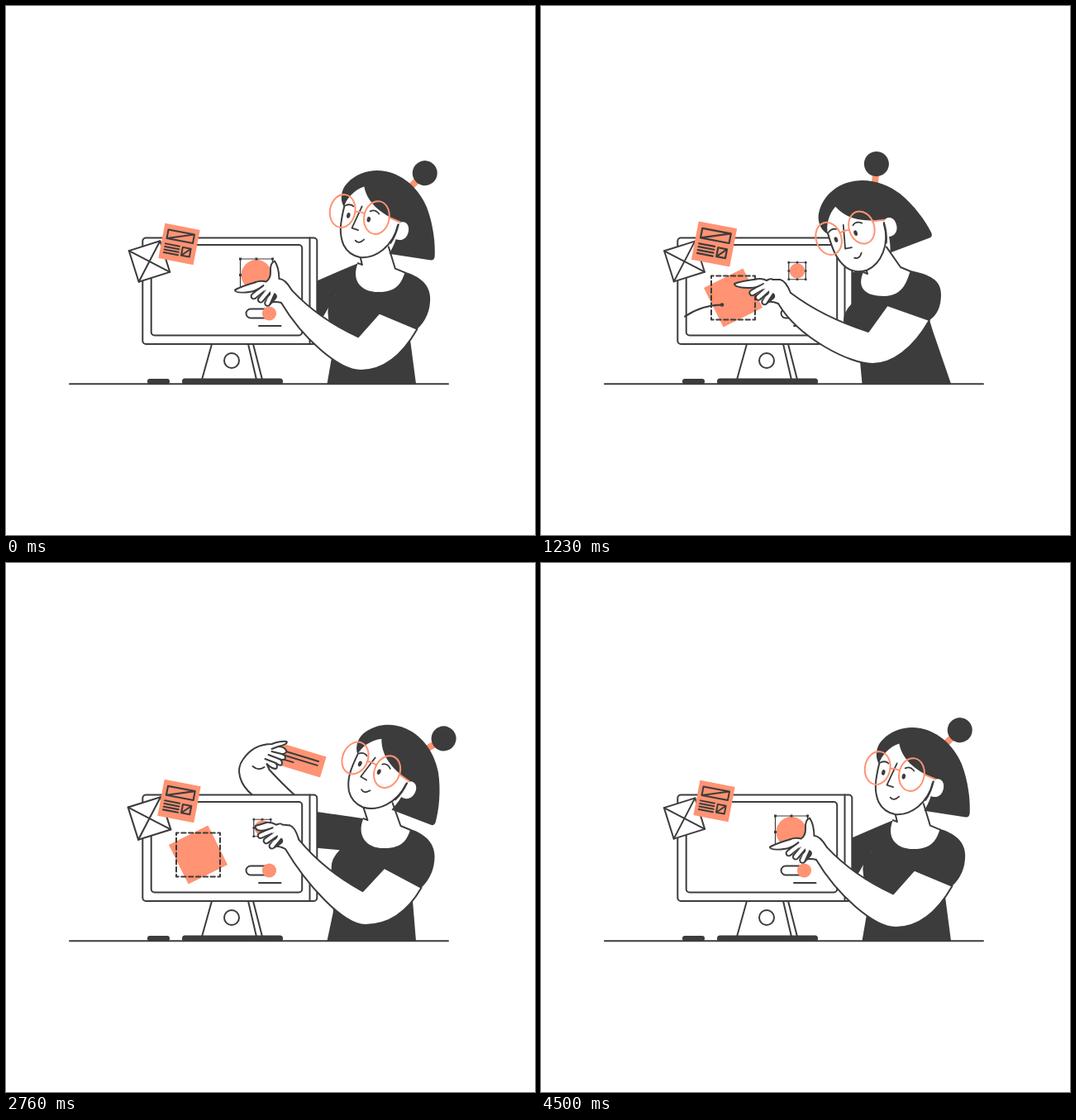
Write an HTML page with a canvas that moves like this. It is 640 px wide and 640 px high and loops after 4530 ms.

```html
<!DOCTYPE html>
<html lang="en">
<head>
<meta charset="utf-8">
<title>Designer at work</title>
<style>
html, body { margin: 0; height: 100%; overflow: hidden; background: #fff; }
canvas { display: block; }
</style>
</head>
<body>
<canvas id="stage" width="640" height="640"></canvas>
<script>
const ctx = document.getElementById('stage').getContext('2d');
const LOOP = 4530, INK = '#3c3c3c', CORAL = '#ff9373', WHITE = '#fff';
let t = 0;

const rad = deg => deg * Math.PI / 180;
const mix = (a, b, k) => a.map((v, i) => v + (b[i] - v) * k);
const arc = k => Math.sin(Math.PI * k);
// Eased 0 to 1 between two times
function ramp(from, to) {
  const u = Math.min(1, Math.max(0, (t - from) / (to - from)));
  return u * u * (3 - 2 * u);
}

function paint(path, fill, stroke, width = 2) {
  if (fill) { ctx.fillStyle = fill; ctx.fill(path); }
  if (stroke) { ctx.strokeStyle = stroke; ctx.lineWidth = width; ctx.stroke(path); }
}
const draw = (d, ...style) => paint(new Path2D(d), ...style);
function oval(x, y, rx, ry, ...style) {
  const path = new Path2D();
  path.ellipse(x, y, rx, ry, 0, 0, 7);
  paint(path, ...style);
}
function box(x, y, w, h, r, ...style) {
  const path = new Path2D();
  path.roundRect(x, y, w, h, r);
  paint(path, ...style);
}
function group(x, y, deg, scale, content) {
  ctx.save();
  ctx.translate(x, y);
  ctx.rotate(rad(deg));
  ctx.scale(scale, scale);
  content();
  ctx.restore();
}

// Lean to the screen, rise away with the card, settle back
function woman() {
  const back = [427.8, 252, 11, 333, 359, -9, 0];
  const leaning = [368, 274.7, -18.6, 287, 360, 0, -12];
  const away = [441.8, 244.3, 23.3, 338, 346, 6, 0];
  const reachOut = ramp(0, 1150), rise = ramp(1850, 2700), settle = ramp(2790, 3240);
  const [headX, headY, tilt, handX, handY, handTilt, sway] =
    mix(mix(mix(back, leaning, reachOut), away, rise), back, settle);
  const x = headX - 10 * arc(reachOut);
  return {
    x, y: headY, tilt, sway, handX,
    handY: handY + 15 * arc(reachOut) - 12 * arc(rise),
    handTilt: handTilt - 15 * (arc(reachOut) + arc(rise)),
    thumb: 1 - ramp(0, 400) + settle,
    point: 1 - ramp(2100, 2700) + settle,
    lean: Math.max(0, (x - 368) / 75) ** .8
  };
}

function farArm() {
  if (t < 1700 || t > 4300) return;
  const raised = mix([240, 315, -35], [357.5, 239, 17], ramp(1700, 2700));
  const held = mix(raised, [335, 255, 5], ramp(2790, 3300));
  const [x, y, tilt] = mix(held, [300, 325, -15], ramp(3830, 4300));
  group(x, y, tilt, 1, () => {
    box(-27.5, -13, 55, 26, 0, CORAL);
    draw('M-22-5H20M-22 0H20M-22 5H-9', null, INK);
  });
  group(x, y, tilt - 17, 1, () => {
    ctx.translate(-358, -239);
    draw(`M315 305Q305 285 299 281C283 268 278 250 287 238C297 223 310 219 322 219Q333 215 340 216
      Q342 219 330 222Q338 222 340 228Q339 231 334 231Q340 233 338 237Q336 239 331 237Q336 240 334 244
      Q332 246 327 242Q330 247 327 249Q322 249 316 243L319 250C330 262 340 272 350 281L370 300`, WHITE, INK);
    draw('M330 222L322 225M334 231L322 228M331 237L318 232M327 242L314 237M299 246Q306 252 313 247', null, INK);
  });
}

function monitor() {
  draw('M77 457.3H535M249 409L237 452M293 409L303 452M299 409L310 452', null, INK);
  oval(273, 429, 9, 9, null, INK);
  box(213, 450.5, 122, 7.5, 3.5, INK);
  box(171, 451, 27, 6.5, 3, INK);
  box(165.3, 280.5, 211, 128.5, 4, WHITE, INK);
  draw('M367.5 280.5V409', null, INK);
  box(175.7, 289, 182.5, 109.5, 4, null, INK);
}

function rotatingSquare() {
  const dashed = ramp(100, 750), solid = ramp(250, 1000);
  const pulse = ramp(1700, 2100) - ramp(2100, 2550), keep = 1 - ramp(3770, 4250);
  const x = 232.5 - 16 * (1 - dashed), y = 353 + 9.4 * (1 - dashed);
  const square = (scale, angle, ...style) => scale > .01 &&
    group(x, y, angle, scale, () => box(-26.5, -26.5, 53, 53, 0, ...style));
  square(solid * (1 - .21 * pulse) * keep, -26.5 + 53.5 * (1 - solid) + 9.5 * pulse, CORAL);
  ctx.setLineDash([5.3, 3.53]);
  ctx.lineDashOffset = 2.65;
  square(dashed * (1 - .19 * pulse) * keep, 75 * (1 - dashed) + 28 * pulse, null, INK);
  ctx.setLineDash([]);
}

function wire() {
  const tip = ramp(120, 430), tail = ramp(560, 1780), length = 112;
  if (tip - tail < .01) return;
  ctx.setLineDash([length * (tip - tail), 999]);
  ctx.lineDashOffset = -length * tail;
  draw('M141.5 429C146 390 180 362 219 361.5', null, INK);
  ctx.setLineDash([]);
  if (tip > .98) oval(219, 361.5, 2.3, 2.3, INK);
}

function selection() {
  const zoom = 1 - ramp(0, 600) + ramp(2790, 3240);
  const [side, x, y] = mix([20.5, 310, 320.5], [39, 303, 325.5], zoom);
  const half = side / 2, grip = 2 + side / 39;
  oval(x, y, half - 1, half - 1, CORAL);
  box(x - half, y - half, side, side, 0, null, INK, 1.2);
  for (const i of [-1, 0, 1]) for (const j of [-1, 0, 1])
    if (i || j) box(x + i * half - grip / 2, y + j * half - grip / 2, grip, grip, 0, INK);
}

function toggle() {
  const off = ramp(3250, 3700) - ramp(3860, 4350);
  box(290.5, 366.5, 34.5, 11, 5.5, null, INK);
  oval(318.5 - 22.5 * off, 372, 8.6, 8.6, CORAL);
  draw(`M${306 + 18 * off} 387H332.5`, null, INK);
}

function papers() {
  const wave = shift => Math.cos((t - shift) / LOOP * 4 * Math.PI);
  group(173.5, 309, -17.5, 1 + .045 * wave(560), () => {
    box(-19.7, -19.7, 39.4, 39.4, 0, WHITE, INK);
    draw('M-19.7-19.7L19.7 19.7M19.7-19.7L-19.7 19.7', null, INK);
  });
  group(209.5, 288, 10.8, 1.05 - .05 * wave(0), () => {
    box(-21.5, -21.5, 43, 43, 0, CORAL);
    draw('M-16-14.7H16V-4H-16ZM-16-4L16-14.7M5 3H15V13H5ZM5 13L15 3', null, INK);
    for (let y = 2.5; y < 14; y += 3.6) draw(`M-16.5 ${y}H1`, null, INK);
  });
}

function farSleeve({ lean }) {
  const lift = ramp(0, 750) + .37 * ramp(2100, 2700) - .32 * ramp(2790, 3300) - 1.05 * ramp(3850, 4350);
  const [nx, ny, sx, sy] = mix([390, 322, 376, 360], [433, 309, 404, 347], lean);
  const top = ny + 24 * (1 - lift), bottom = top + 44 + 20 * Math.max(0, 1 - lift);
  draw(`M${nx} ${ny}Q${nx - 15} ${ny + (top - ny) * .25} 370 ${top}V${bottom}L${sx} ${sy}H${nx}Z`, INK);
}

function torso({ x, y, tilt, lean }) {
  const c = Math.cos(rad(tilt)), s = Math.sin(rad(tilt));
  const onHead = (dx, dy) => `${x + dx * c - dy * s} ${y + dx * s + dy * c}`;
  const [nx, ny] = mix([390, 322], [433, 309], lean);   // collar
  const [rx, ry] = mix([447, 320], [490, 322], lean);   // near shoulder
  const [ox, oy] = mix([484, 349], [519, 355], lean);   // shoulder side
  const [ax, ay] = mix([470, 380], [503, 393], lean);   // sleeve end
  const [cx, cy] = mix([376, 360], [404, 347], lean);   // chest
  const [wx, wy] = mix([386, 430], [396, 422], lean);   // waist
  const [dx, dy] = mix([474, 393], [492, 406], lean);
  const low = 351 - 6 * lean;

  draw(`M${nx} ${ny}L${cx} ${cy}Q${cx - 10} ${cy + 10} ${cx - 10} ${cy + 21}L${wx} ${wy}L388.5 457H496L${dx} ${dy}
    L${ax} ${ay}Q${ox} ${oy + 22} ${ox} ${oy}C${ox} ${oy - 18} ${ox - 14} ${ry + 5} ${rx} ${ry}Z`, INK);
  draw(`M${nx} ${ny}C${nx - 8} ${ny + 18} ${nx + 1} ${low} ${nx + 25} ${low}S${rx - 4} ${ry + 11} ${rx} ${ry}
    L${rx - 12} ${ry - 4}L${onHead(42, 32)}L${onHead(10, 30)}L${onHead(10, 48)}L${nx + 5} ${ny + 2}Z`, WHITE);
  draw(`M${onHead(42, 32)}L${rx - 12} ${ry - 4}L${rx} ${ry + 1}
    M${onHead(10, 49)}L${nx + 5} ${ny + 2}L${nx} ${ny}`, null, INK);
}

function nearArm({ lean, handX, handY, handTilt }) {
  const sag = .35 * (handY - 360), c = Math.cos(rad(handTilt)), s = Math.sin(rad(handTilt));
  const [ax, ay] = mix([470, 380], [503, 393], lean);               // sleeve end
  const [bx, by] = mix([419, 362 + sag], [458, 374 + sag], lean);   // sleeve inside
  const [kx, ky] = mix([396, 394 + sag], [432, 402 + sag], lean);   // crease
  const [ex, ey] = mix([401, 433 + sag], [435, 443 + sag], lean);   // elbow
  const ux = handX + 15 * c + 13 * s, uy = handY + 15 * s - 13 * c; // wrist
  draw(`M${ux} ${uy}Q${(ux + kx) / 2 - 8} ${(uy + ky) / 2 + 6} ${kx} ${ky}L${bx} ${by}L${ax} ${ay}
    C${ax - 20} ${ay + 35} ${ex + 24} ${ey} ${ex} ${ey}
    C${ex - 27} ${ey} ${handX + 25} ${handY + 42} ${handX} ${handY}`, WHITE, INK);
}

function hand({ handX, handY, handTilt, thumb, point }) {
  const tip = -39 - 14 * point;
  group(handX, handY, handTilt, 1, () => {
    draw('M15-13L2-29L-28-29L-18-4Q-8-3 0 0Z', WHITE);
    draw('M-14-2Q-7-3 0 0', null, INK);
    draw(`M15-13Q9-28 2-29Q4 ${-29 - 14 * thumb} 0 ${-29 - 22 * thumb}Q-6 ${-29 - 21 * thumb} -7 ${-29 - 10 * thumb}
      Q-8-31-14-28Q-20-31-27-29.5`, WHITE, INK);
    for (let i = 2; i >= 0; i--) {
      const end = `L${-31.5 + 7.5 * i} ${-13 + 5.5 * i}`;
      draw(`M${-22 + 7 * i} ${-19 + 5 * i}${end}`, null, INK, 8.5);
      draw(`M${-14 + 3 * i} ${-23 + 4 * i}${end}`, null, WHITE, 4.5);
    }
    draw(`M-26-29.5Q${tip + 7} -27 ${tip} -24Q${tip} -19 -33-19Q-27-19-18-24`, WHITE, INK);
  });
}

function head({ x, y, tilt, sway }) {
  const open = 1 - .88 * (ramp(3680, 3760) - ramp(3840, 3920));
  group(x, y, tilt, 1, () => {
    group(50, -40, sway, 1, () => {
      draw('M3-3L14-18', null, CORAL, 8);
      oval(18, -24, 15, 15, INK);
    });
    const jaw = 'M-20-6C-21 16-20 28-12 40C-6 48 3 51 11 51C29 49 47 31 48 4';
    draw(jaw + 'L30-25L0-36Z', WHITE);
    draw(jaw, null, INK);
    draw(`M-20-5C-27-12-28-25-22-34C-12-50 5-57 21-57C45-57 66-42 78-24C90-5 97 18 99 33Q99 38 95 38
      L44 40C49 28 50 15 50 0C30-5 8-12-1-34C-12-28-20-15-20-5Z`, INK);
    draw('M48.5 2C53-4 62-1 62 9C62 18 56 23 48 21Z', WHITE);
    draw('M48.5 3Q48 16 43.5 27', null, INK);
    draw('M-19-7Q-14-11-9-8M12-6Q17-10 23-5M1-10L-6 18L2 19M1 32Q6 36 11 29', null, INK, 1.8);
    for (const side of [-1, 1]) {
      oval(12.5 * side - .5, 4, 2.2, 3.4 * open, INK);
      oval(21 * side, 0, 15.2, 20, null, CORAL);
    }
    draw('M-6-2Q0-4 6-2M36-3L50 0', null, CORAL);
  });
}

function render() {
  t = performance.now() % LOOP;
  const pose = woman();
  ctx.fillStyle = WHITE;
  ctx.fillRect(0, 0, 640, 640);
  ctx.lineCap = ctx.lineJoin = 'round';
  farArm();
  farSleeve(pose);
  monitor();
  rotatingSquare();
  wire();
  selection();
  toggle();
  papers();
  torso(pose);
  nearArm(pose);
  hand(pose);
  head(pose);
  requestAnimationFrame(render);
}
render();
</script>
</body>
</html>
```
